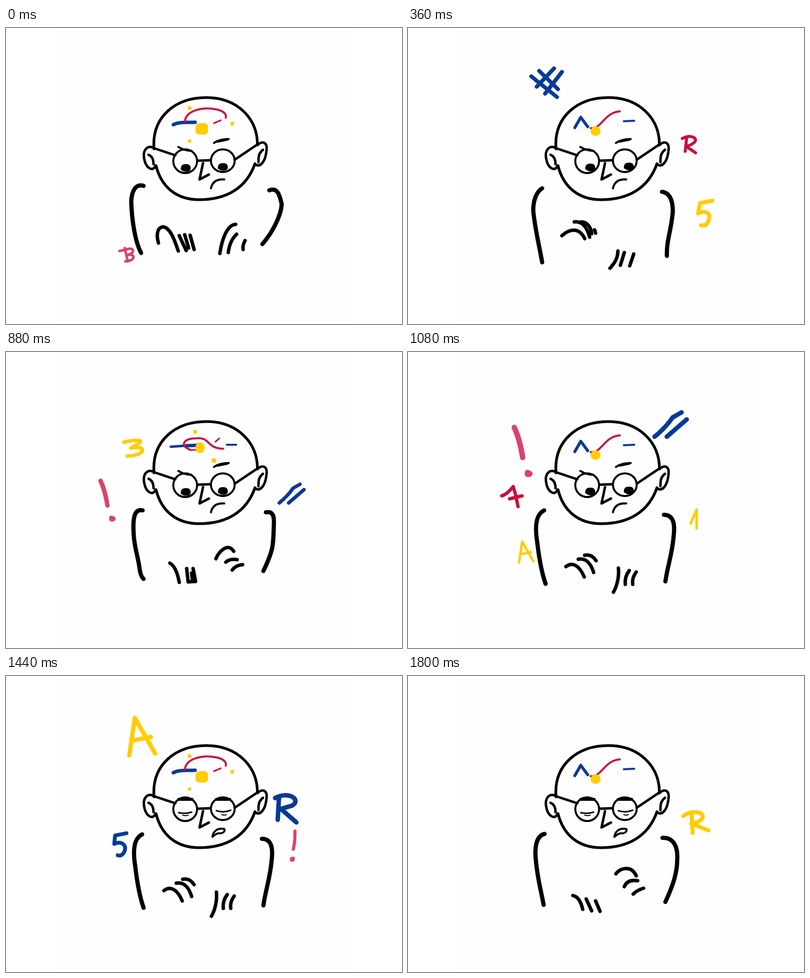
These frames come from a looping animation (800x600 px, 1840 ms). An HTML page:

```html
<!DOCTYPE html>
<html lang="en">
<head>
<meta charset="utf-8">
<title>Thinking hard</title>
<style>
html, body { margin: 0; width: 100%; height: 100%; overflow: hidden; background: #fff; }
svg { display: block; width: 100vw; height: 100vh; }
path { fill: none; stroke: #000; stroke-linecap: round; stroke-linejoin: round; }
</style>
</head>
<body>
<svg viewBox="0 0 800 600">
  <rect x="101" width="597" height="600" fill="#fefefe"/>
  <circle cx="502" cy="136" r="0.8" fill="#ccc"/>
  <g stroke-width="5">
    <path style="stroke-width:5.5px" d="M299 245C294 180 342 141 405 141C466 141 508 182 508 237"/>
    <path style="stroke-width:5.5px" d="M303 279C314 323 345 348 390 348C446 348 486 324 503 275"/>
    <path style="stroke-width:5px" d="M300 244C287 236 276 246 279 264C282 284 297 293 302 279M288 257C296 260 298 267 298 276"/>
    <path style="stroke-width:5px" d="M508 237C520 227 529 233 526 250C524 269 515 283 504 277M519 247C510 254 510 262 510 272"/>
  </g>
  <g id="eyes"></g>
  <g stroke-width="4">
    <path d="M386 270A24 24 0 1 1 338 270A24 24 0 1 1 386 270M462 269A24 23 0 1 1 414 269A24 23 0 1 1 462 269"/>
    <path stroke-width="5" d="M300 244L342 258M387 269L413 268M462 267L508 236"/>
    <path stroke-width="5" d="M398 274L391 307L410 297"/>
  </g>
  <g id="face"></g>
  <g id="thought"></g>
  <g id="arms"></g>
  <g id="symbols"></g>
</svg>
<script>
const FRAME = 40, FRAMES = 46;
const BLUE = '#063a98', RED = '#cc0c3c', PINK = '#d84468', GOLD = '#ffcc05', BLACK = '#000';

const line = (d, width, color = BLACK) =>
  `<path d="${d}" style="stroke:${color};stroke-width:${width}px"/>`;
const dot = (x, y, rx, ry = rx) =>
  `<ellipse cx="${x}" cy="${y}" rx="${rx}" ry="${ry}" fill="${GOLD}"/>`;

// Each pose: sleeves, then fingers.
const arms = [
  ['M278 320C262 315 254 330 253 352C254 385 260 432 273 456M532 329C549 322 553 340 557 357C556 380 538 415 518 438',
   'M308 436C302 415 308 403 318 403C332 406 340 428 348 452M350 421L364 451M361 419L369 446M372 420L380 449M432 457C436 430 446 399 464 398M466 418C455 428 451 440 449 455M483 431C479 438 478 443 479 449'],
  ['M276 321C258 317 256 340 258 370C259 395 268 420 270 440Q272 455 278 460M525 325C541 322 542 335 541 352C540 390 541 400 520 444',
   'M331 428C342 434 347 450 350 467M365 439L368 466L383 465L378 439M375 448L377 465M424 419C430 405 448 385 460 404M444 426Q453 418 467 421M457 442Q464 432 478 431'],
  ['M276 320C258 324 256 350 258 370C261 410 269 435 274 464M514 328C536 327 545 345 544 370C544 400 535 425 520 458',
   'M333 445C344 447 350 460 353 473M360 452L371 476M379 456L388 477M420 401C430 388 452 384 461 405M437 427C442 415 452 413 464 415M455 442Q463 434 476 430'],
  ['M275 321C256 330 257 360 261 385C265 420 271 450 278 470M517 330C537 330 539 350 537 370C534 410 525 430 520 465',
   'M319 435C332 425 346 432 356 456M344 420C360 417 370 430 375 447M357 412C368 410 375 415 380 423M425 438C427 455 422 475 415 487M447 443C440 452 438 462 439 471M461 446Q452 458 454 471'],
  ['M271 325C258 333 253 352 253 370C256 405 267 450 271 475M513 332C530 334 535 352 535 372C532 410 522 430 523 462',
   'M311 421C325 408 345 402 357 427M336 393C352 391 362 405 367 424M350 393C362 393 370 404 371 417M377 409L379 416M408 487C416 478 424 468 424 452M437 455L429 481M456 458L448 482']
].map(([sleeves, fingers]) => line(sleeves, 8.5) + line(fingers, 7));

const arch =
  line('M338 196C350 190 365 192 382 191', 7, BLUE) +
  line('M361 191C363 165 400 160 425 165C440 168 446 175 444 182', 4, RED) +
  line('M420 193L434 187', 3, RED) +
  `<rect x="383" y="193" width="25" height="23" rx="7" fill="${GOLD}"/>` +
  dot(371, 162, 4) + dot(457, 194, 4) + dot(371, 229, 3.5);
const loop =
  line('M333 192L390 188', 5, BLUE) + line('M365 190L388 189', 7, BLUE) +
  line('M372 198C350 190 358 175 385 175C413 172 405 196 439 196', 4, RED) +
  line('M372 199L387 198M423 182L431 175', 3, RED) +
  line('M446 188L465 188', 4, BLUE) +
  dot(392, 194, 9.5, 11) + dot(382, 162, 4) + dot(420, 220, 5);
const tick =
  line('M337 202L349 181L363 200', 6, BLUE) +
  line('M369 203C391 206 396 171 428 169', 4, RED) +
  dot(379, 209, 10) + line('M436 189L457 188', 4, BLUE);
const zigzag =
  line('M402 183C402 163 420 157 426 172C430 185 427 195 437 195', 4, RED) +
  line('M406 197L415 209M419 199L425 195M428 193L438 183C452 184 463 193 465 204L474 187', 6, BLUE) +
  dot(373, 176, 5, 4) + dot(351, 201, 2.5) + dot(398, 214, 9);
const hook =
  line('M380 168C410 162 438 168 438 185C437 199 422 199 422 182', 4, RED) +
  line('M337 198L354 196M456 197L462 206L468 196', 6, BLUE) +
  dot(362, 178, 10) + dot(395, 211, 3);
const thoughts = [arch, loop, loop, tick, zigzag, hook];

const pupil = (x, y) =>
  `<path d="M${x - 10} ${y + 3}C${x - 10} ${y - 8} ${x - 4} ${y - 8} ${x + 1} ${y - 8}C${x + 11} ${y - 8} ${x + 11} ${y} ${x + 9} ${y + 5}Q${x} ${y + 11} ${x - 10} ${y + 3}Z" style="fill:#000;stroke:none"/>`;
const looks = {
  middle: pupil(363, 284) + pupil(438, 282),
  right: pupil(368, 283) + pupil(446, 281),
  left: pupil(356, 282) + pupil(431, 282),
  shut: line('M349 277Q362 280 375 276M425 273Q440 278 454 272', 3) +
        line('M357 282Q363 284 368 282M436 281Q441 283 445 281', 2)
};
const lookAt = n =>
  n < 6 ? 'middle' : n < 12 ? 'right' : n < 19 ? 'left' :
  n < 26 ? 'middle' : n < 36 ? 'right' : 'shut';

const openMouth = line('M417 326C419 313 428 308 441 310C443 315 439 318 434 319C428 318 424 320 417 326', 4);
const faces = {
  frown: line('M348 241Q361 249 375 249M420 233Q432 225 450 225', 4) +
         line('M427 230L447 226', 5) +
         line('M414 325C417 311 427 306 441 307', 4),
  doubt: line('M348 226Q360 232 376 234M419 250Q431 242 450 245', 4) + openMouth,
  tired: line('M349 250L376 250M425 250L452 250', 6) + openMouth
};
const faceAt = n => n < 28 ? 'frown' : n < 36 ? 'doubt' : 'tired';

// Symbols rise along a bowed track on either side of the head.
const track = (side, u) => side < 0
  ? [222 + 20 * Math.cos(2 * Math.PI * u) + 25 * u * u, 460 - 350 * u]
  : [547 + 170 * u - 210 * u * u, 453 - 350 * u];
const size = u => 36 + 42 * u;

const symbol = (side, from, to, at, u0, rate, color, width, d) =>
  ({ side, from, to, at, u0, rate, art: line(d, width, color) });
const symbols = [
  symbol(-1, 0, 8, 0, 0, .12, PINK, 5, 'M229 452L239 450M240 446L246 473M241 450C258 441 263 456 246 460C263 457 261 473 241 473'),
  symbol(-1, 1, 10, 9, 1, .11, BLUE, 8, 'M249 98L301 140M265 87L303 124M295 82L260 119M311 89L277 133'),
  symbol(-1, 10, 19, 16, .69, .09, GOLD, 8, 'M233 215C216 214 214 196 226 194C240 194 239 210 233 215C249 218 257 229 248 239C236 246 228 234 233 215Z'),
  symbol(-1, 14, 30, 22, .46, .057, PINK, 9, 'M191 261Q200 280 205 311M213 336L217 338L216 339L213 339Z'),
  symbol(-1, 17, 25, 22, .76, .11, GOLD, 7, 'M238 183C258 178 278 177 270 184L252 195C285 188 284 210 245 211'),
  symbol(-1, 23, 34, 32, .93, .09, RED, 9, 'M237 134Q250 131 268 109L274 130L281 163M258 142L292 134'),
  symbol(-1, 26, 37, 32, .61, .09, GOLD, 7, 'M203 279L212 218L245 276M207 255L238 249'),
  symbol(-1, 33, 44, 40, .7, .09, BLUE, 10, 'M266 186L236 192L234 214C250 206 266 215 262 230C258 243 250 247 243 244'),
  symbol(-1, 37, 44, 40, .34, .09, RED, 10, 'M187 325C200 322 222 318 215 326L199 338C225 332 236 339 228 350C218 358 205 360 192 361'),
  symbol(1, 4, 12, 9, .62, .11, RED, 6, 'M563 222L560 250M554 224C570 214 588 224 578 232C573 237 566 239 562 240L581 253'),
  symbol(1, 7, 15, 9, .22, .11, GOLD, 8, 'M615 350L590 355L586 376C600 368 612 375 608 388C605 398 600 402 592 400'),
  symbol(1, 12, 21, 16, .44, .09, BLUE, 7, 'M563 323L583 272L598 327M570 309L596 305'),
  symbol(1, 17, 28, 22, .475, .08, BLUE, 7, 'M552 306Q570 291 580 276L594 268M571 306L602 279'),
  symbol(1, 23, 35, 32, .73, .08, GOLD, 7, 'M547 211L563 173L563 224'),
  symbol(1, 30, 39, 32, .21, .08, BLUE, 7, 'M553 362L551 398M547 364C570 352 588 368 573 376L556 381L580 402'),
  symbol(1, 33, 44, 40, .63, .08, PINK, 8, 'M576 194Q577 220 572 241M567 265L572 264L571 269L567 269Z'),
  symbol(1, 40, 45, 45, .45, .09, GOLD, 8, 'M573 280L575 318M556 284C575 270 600 276 595 288C590 296 580 298 572 299L607 313')
];

function drawSymbol(s, n) {
  if (n < s.from || n > s.to) return '';
  const u = s.u0 + (n - s.at) * s.rate;
  const [x, y] = track(s.side, u), [x0, y0] = track(s.side, s.u0);
  return `<g transform="translate(${x} ${y}) scale(${size(u) / size(s.u0)}) translate(${-x0} ${-y0})">${s.art}</g>`;
}

const layers = {};
function show(id, markup) {
  if (layers[id] === markup) return;
  layers[id] = markup;
  document.getElementById(id).innerHTML = markup;
}

function render(ms) {
  const n = Math.floor(ms / FRAME) % FRAMES;
  show('arms', arms[Math.floor(n / 2) % arms.length]);
  show('thought', thoughts[Math.floor(n / 3) % thoughts.length]);
  show('eyes', looks[lookAt(n)]);
  show('face', faces[faceAt(n)]);
  show('symbols', symbols.map(s => drawSymbol(s, n)).join(''));
}

const start = performance.now();
function tickClock() {
  render(performance.now() - start);
  requestAnimationFrame(tickClock);
}
tickClock();
</script>
</body>
</html>
```
